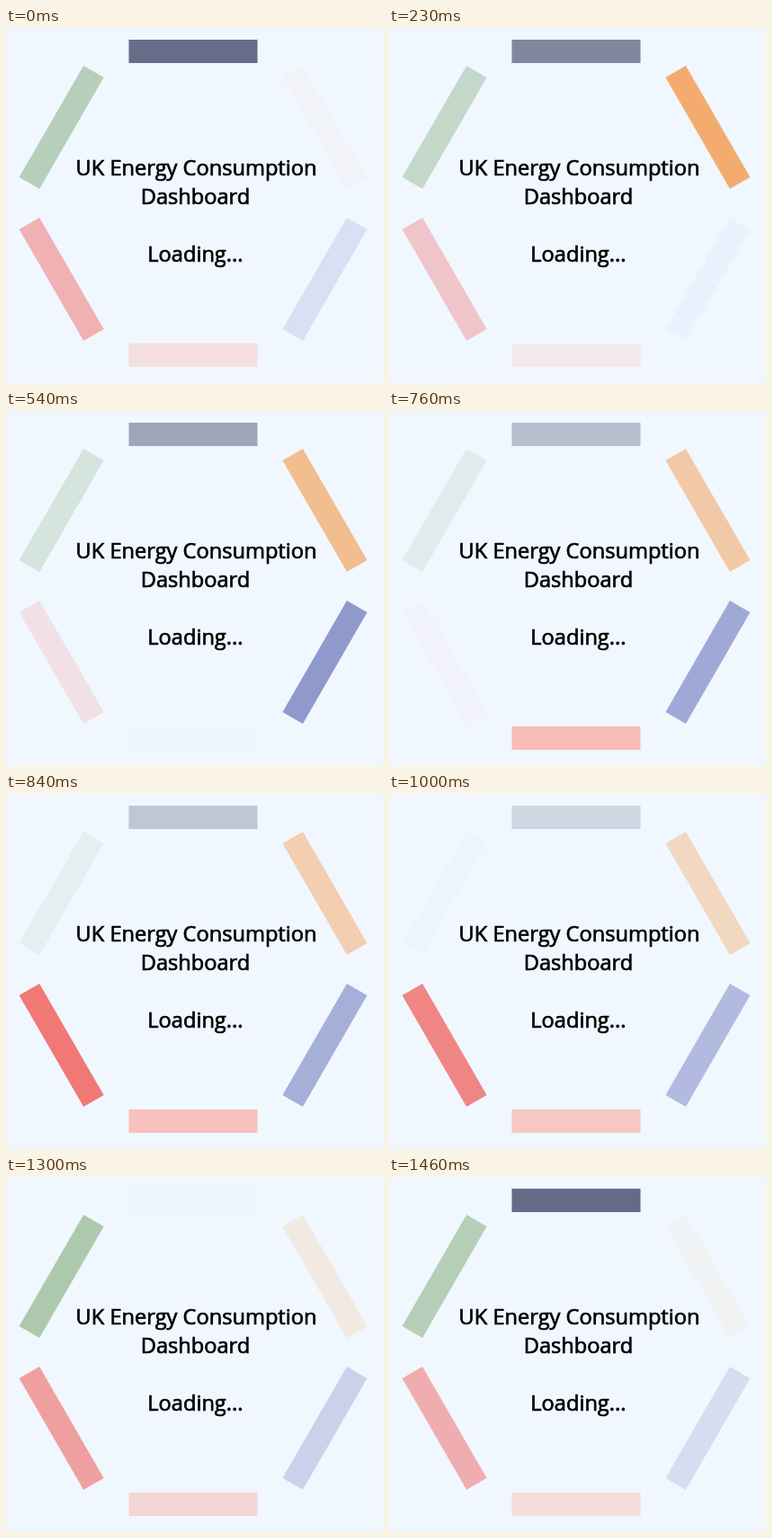
Animation of 419x395 px, one loop 1.61 s. Source, as an HTML page:

```html
<!DOCTYPE html>
<html lang="en">
<head>
<meta charset="utf-8">
<title>Loading</title>
<style>
  html, body { margin: 0; width: 100%; height: 100%; overflow: hidden; background: #f0f7ff; }
  svg { display: block; }
  /* a thin stroke turns the regular weight into a semibold */
  text {
    font: 400 23.6px "Open Sans", "Noto Sans", sans-serif;
    text-anchor: middle; stroke: #000; stroke-width: .7px;
  }
</style>
</head>
<body>
<svg width="419" height="395" viewBox="0 0 419 395">
  <g id="ring" transform="translate(208 195)"></g>
  <text x="211.5" y="164">UK Energy Consumption</text>
  <text x="210.5" y="196">Dashboard</text>
  <text x="210.5" y="260">Loading...</text>
</svg>
<script>
  const LOOP = 1610, FADE = 1500, STAGGER = 250, LEAD = 185;
  const colors = ['#555c79', '#f4a35c', '#7f89c4', '#fab6ac', '#f07774', '#a0c09e'];
  // moments at which the picture is refreshed
  const ticks = [0, 70, 150, 230, 310, 380, 460, 540, 610, 690, 760, 840,
                 1000, 1070, 1150, 1300, 1380, 1460];

  const ring = document.getElementById('ring');
  const bars = colors.map((fill, i) => {
    const bar = document.createElementNS('http://www.w3.org/2000/svg', 'rect');
    const attrs = { x: -71.5, y: -182, width: 143, height: 26, fill, transform: `rotate(${i * 60})` };
    for (const name in attrs) bar.setAttribute(name, attrs[name]);
    return ring.appendChild(bar);
  });

  // each bar lights up in turn, then fades out evenly
  function draw(time) {
    const tick = ticks.filter(t => t <= time).pop();
    bars.forEach((bar, i) => {
      const age = (LEAD + tick - i * STAGGER + FADE) % FADE;
      bar.setAttribute('opacity', 1 - age / FADE);
    });
  }

  const start = performance.now();
  function loop() {
    draw((performance.now() - start) % LOOP);
    requestAnimationFrame(loop);
  }
  loop();
</script>
</body>
</html>
```
